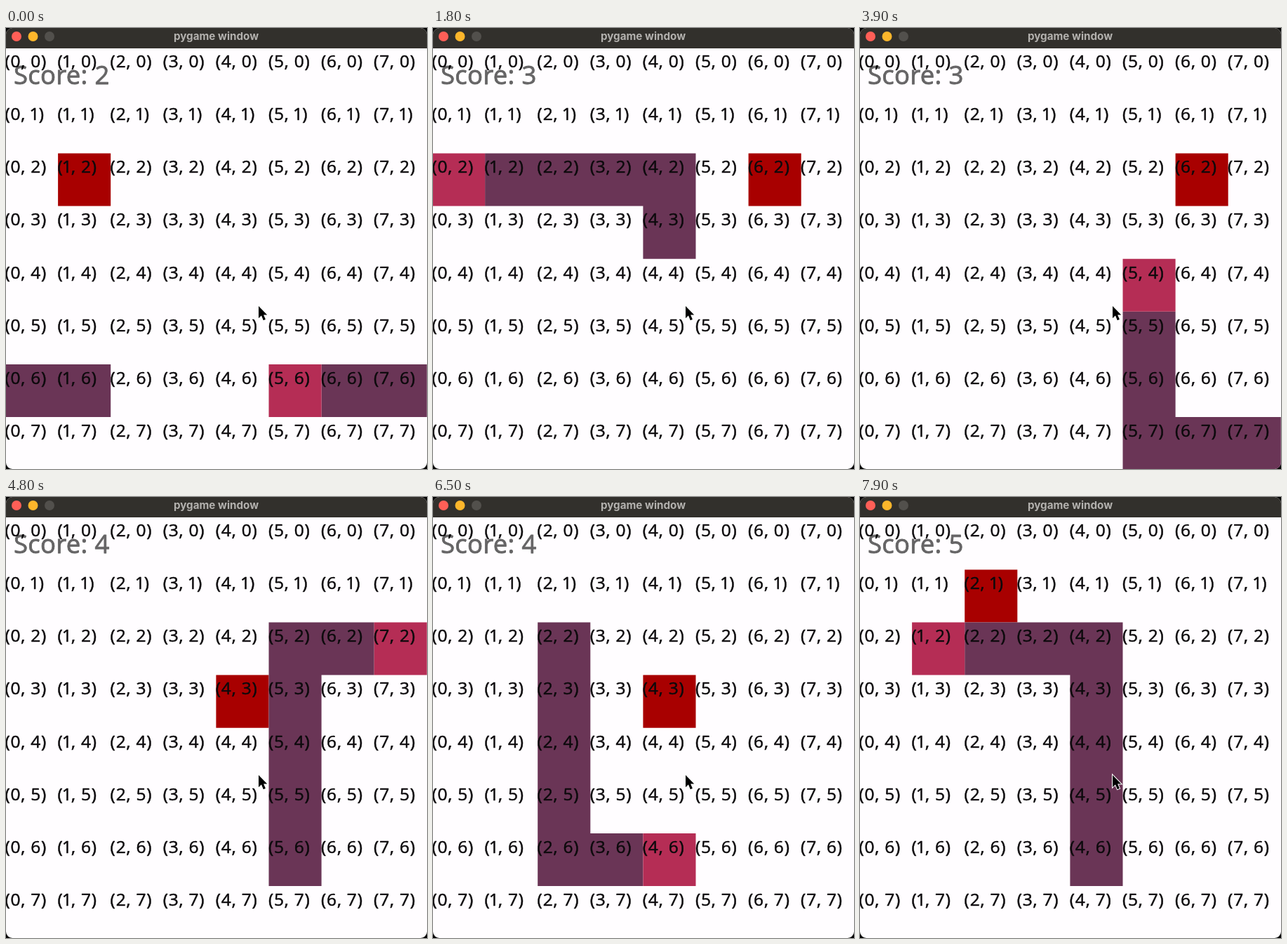
These frames come from a looping animation (600x628 px, 8 s). An HTML page:

```html
<!DOCTYPE html>
<html lang="en">
<head>
<meta charset="utf-8">
<title>Snake</title>
<style>
  html, body { margin: 0; width: 100%; height: 100%; overflow: hidden; background: #000; }
  svg { display: block; width: 600px; height: 628px; }
  text { stroke-linejoin: round; }
  .title { font: 700 15.2px Inter, sans-serif; fill: #b3b1ae; text-anchor: middle; }
  .label {
    font: 24.5px "Comic Sans MS", "Open Sans", sans-serif; letter-spacing: .8px;
    fill: #0c0a0c; stroke: #0c0a0c; stroke-width: .5px;
  }
  .score {
    font: 36.5px "Comic Sans MS", "Open Sans", sans-serif; letter-spacing: .3px;
    stroke: #000; stroke-width: .9px; opacity: .6;
  }
</style>
</head>
<body>
<svg viewBox="0 0 600 628">
  <clipPath id="frame"><rect width="600" height="628" rx="9"/></clipPath>
  <g clip-path="url(#frame)">
    <rect width="600" height="628" fill="#fffdff"/>
    <path id="fruit" fill="#a80000"/>
    <path id="body" fill="#6a3556"/>
    <path id="head" fill="#b52d55"/>
    <g id="labels"></g>
    <text id="score" class="score" x="11" y="80"></text>
    <rect width="600" height="29" fill="#32302c"/>
    <circle cx="15" cy="12" r="7" fill="#ff5f57"/>
    <circle cx="38.5" cy="12" r="7" fill="#fdb62b"/>
    <circle cx="62" cy="12" r="7" fill="#52504c"/>
    <text class="title" x="299.5" y="16.5">pygame window</text>
    <path d="M360 396V413.2L364 409.6L366.8 416.2L369.9 414.9L367.1 408.5H372.2Z"
          stroke="#fff" stroke-width="2" paint-order="stroke"/>
  </g>
</svg>
<script>
const LOOP = 8000, STEP = 200, LEAD = 100, SIZE = 8, CELL = 75.1;
const LEFT = -1, TOP = 28.3;
const DIRS = { L: [-1, 0], R: [1, 0], U: [0, -1], D: [0, 1] };
const START_LENGTH = 5, START_SCORE = 2;

// Runs of moves, beginning at the first tail cell
const ROUTE = "L5 U4 L5 D5 L2 U5 R5 D4 R2 U4 L3";

// Each meal moves the fruit, adds a point and grows the snake
const FRUIT = [
  { step: 0, at: [1, 2] },
  { step: 8, at: [6, 2] },
  { step: 23, at: [4, 3] },
  { step: 36, at: [2, 1] }
];

const $ = id => document.getElementById(id);

function buildRoute() {
  const route = [[1, 6]];
  for (const run of ROUTE.split(" ")) {
    const [dx, dy] = DIRS[run[0]];
    for (let i = 0; i < +run[1]; i++) {
      const [x, y] = route[route.length - 1];
      route.push([(x + dx + SIZE) % SIZE, (y + dy + SIZE) % SIZE]);
    }
  }
  return route;
}

function addLabel(col, row) {
  const el = document.createElementNS("http://www.w3.org/2000/svg", "text");
  // The digit 1 sits closer to its neighbours
  const a = col === 1 ? -1.7 : 0, b = row === 1 ? -1.7 : 0;
  el.setAttribute("class", "label");
  el.setAttribute("x", LEFT + col * CELL - 0.6);
  el.setAttribute("y", TOP + row * CELL + 27.8);
  el.setAttribute("dx", [0, a, a, 0, b, b].join(" "));
  el.textContent = `(${col}, ${row})`;
  $("labels").append(el);
}

// All squares of a part share one path, so no seams show between them
function paint(id, cells) {
  const square = ([col, row]) =>
    `M${LEFT + col * CELL} ${TOP + row * CELL}h${CELL}v${CELL}h${-CELL}z`;
  $(id).setAttribute("d", cells.map(square).join(""));
}

const route = buildRoute();
for (let row = 0; row < SIZE; row++)
  for (let col = 0; col < SIZE; col++) addLabel(col, row);

let shown = -1;
function draw(time) {
  const step = Math.floor((time % LOOP + LEAD) / STEP);
  if (step === shown) return;
  shown = step;
  const meals = FRUIT.filter(f => f.step <= step).length - 1;
  const head = step + START_LENGTH - 1;
  paint("fruit", [FRUIT[meals].at]);
  paint("body", route.slice(step - meals, head));
  paint("head", [route[head]]);
  $("score").textContent = `Score: ${START_SCORE + meals}`;
}

const start = performance.now();
function tick() {
  draw(performance.now() - start);
  requestAnimationFrame(tick);
}
tick();
</script>
</body>
</html>
```
